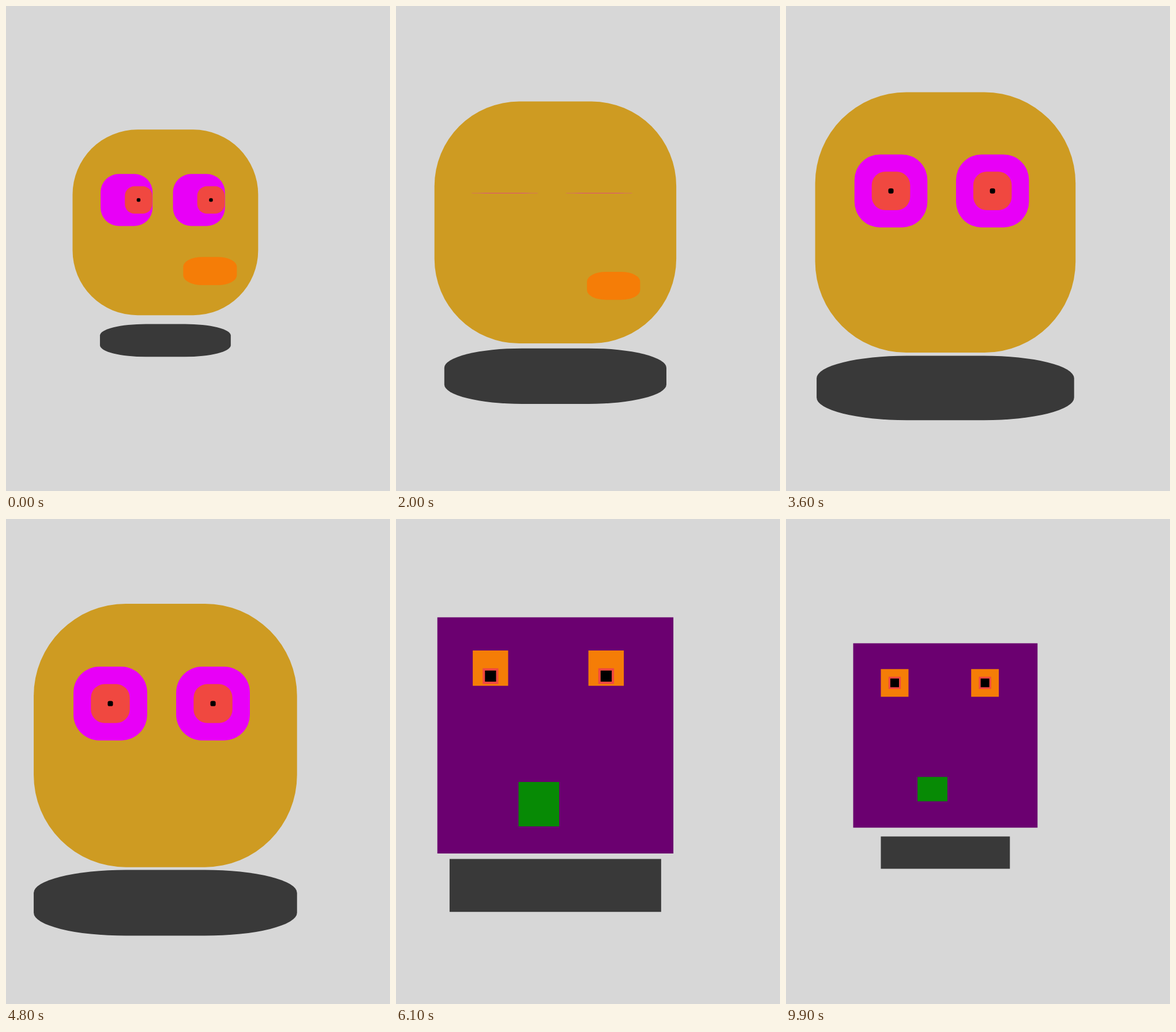
Animation, 666 px wide and 841 px high, one loop 10000 ms. Source, as an HTML page with a canvas:

```html
<!DOCTYPE html>
<html lang="en">
<head>
<meta charset="utf-8">
<title>Two faces</title>
<style>
html, body { margin: 0; height: 100%; overflow: hidden; background: #d7d7d7; }
canvas { display: block; }
</style>
</head>
<body>
<canvas id="stage" width="666" height="841"></canvas>
<script>
const ctx = document.getElementById('stage').getContext('2d');
const LOOP = 10000, STEP = 100, SWITCH = 4900;
const CX = 276.4, CY = 375.3, SIZE = 456.7;

// Positions and sizes are fractions of the head; keys are [progress, ...values].
const round = {
  start: -145, length: 4945, radius: 0.35, grow: [0.7, 1],
  skin: '#ce9b22', white: '#e800f7', lips: '#f57d07',
  eyes: [-0.209, 0.181], eyeY: -0.121, eye: 0.28, iris: 0.1475, pupil: 0.02,
  look: [[0, 0.5, 0], [0.25, 0, 0]],
  lid: [[0.25, 1], [0.45, 0], [0.75, 1]],
  mouth: [0.2406, 0.262, 0.292, 0.1535],
  talk: [[0, 1, 1], [0.5, 0.75, 0.75], [0.75, 0, 0]]
};
const square = {
  start: 4990, length: 5000, radius: 0, grow: [1, 0.7],
  skin: '#6b0070', white: '#f57d07', lips: '#078a05',
  eyes: [-0.275, 0.215], eyeY: -0.285, eye: 0.15, iris: 0.0666, pupil: 0.047,
  look: [[0, 0.51, 0], [0.25, 0, 0.51], [0.5, -0.51, 0], [0.75, 0, -0.51], [1, 0, 0]],
  lid: [[0, 1]],
  mouth: [-0.07, 0.291, 0.2, 0.2185],
  talk: [[0, 1, 1], [0.25, 0.86, 0.86], [0.55, 0.725, 0.725], [1, 0.81, 0.605]]
};

// cubic-bezier(.25, .1, .25, 1)
function ease(x) {
  let lo = 0, hi = 1;
  for (let i = 0; i < 24; i++) {
    const s = (lo + hi) / 2;
    if (0.75 * s * (1 - s) + s ** 3 < x) lo = s; else hi = s;
  }
  return 0.3 * lo * (1 - lo) ** 2 + 3 * lo * lo * (1 - lo) + lo ** 3;
}

function track(keys, p) {
  const i = keys.findIndex(key => key[0] > p);
  if (i < 0) return keys[keys.length - 1].slice(1);
  if (i === 0) return keys[0].slice(1);
  const a = keys[i - 1], b = keys[i];
  const e = ease((p - a[0]) / (b[0] - a[0]));
  return a.slice(1).map((v, n) => v + (b[n + 1] - v) * e);
}

function box(x, y, w, h, radius, color) {
  if (w <= 0 || h <= 0) return;
  ctx.fillStyle = color;
  ctx.beginPath();
  ctx.roundRect(x - w / 2, y - h / 2, w, h, { x: w * radius, y: h * radius });
  ctx.fill();
}

function drawFace(face, t) {
  const p = Math.min(1, Math.max(0, (t - face.start) / face.length));
  const [from, to] = face.grow;
  const scale = from + (to - from) * ease(p);
  const size = SIZE * scale;
  const part = (x, y, w, h, color) =>
    box(CX + x * size, CY + y * size, w * size, h * size, face.radius, color);

  part(0, 0.6355, scale, scale / 4, '#393939');
  part(0, 0, 1, 1, face.skin);

  const [lookX, lookY] = track(face.look, p);
  const [lid] = track(face.lid, p);
  for (const x of face.eyes) {
    const ix = x + lookX * face.iris;
    const iy = face.eyeY + lookY * face.iris * lid;
    part(x, face.eyeY, face.eye, face.eye * lid, face.white);
    part(ix, iy, face.iris, face.iris * lid, '#f04840');
    part(ix, iy, face.pupil, face.pupil * lid, '#000');
  }

  const [mx, my, mw, mh] = face.mouth;
  const [sx, sy] = track(face.talk, p);
  part(mx, my, mw * sx, mh * sy, face.lips);
}

const began = performance.now();
function frame() {
  const elapsed = (performance.now() - began) % LOOP;
  const t = Math.floor(elapsed / STEP) * STEP;
  ctx.fillStyle = '#d7d7d7';
  ctx.fillRect(0, 0, 666, 841);
  drawFace(t < SWITCH ? round : square, t);
  requestAnimationFrame(frame);
}
frame();
</script>
</body>
</html>
```
